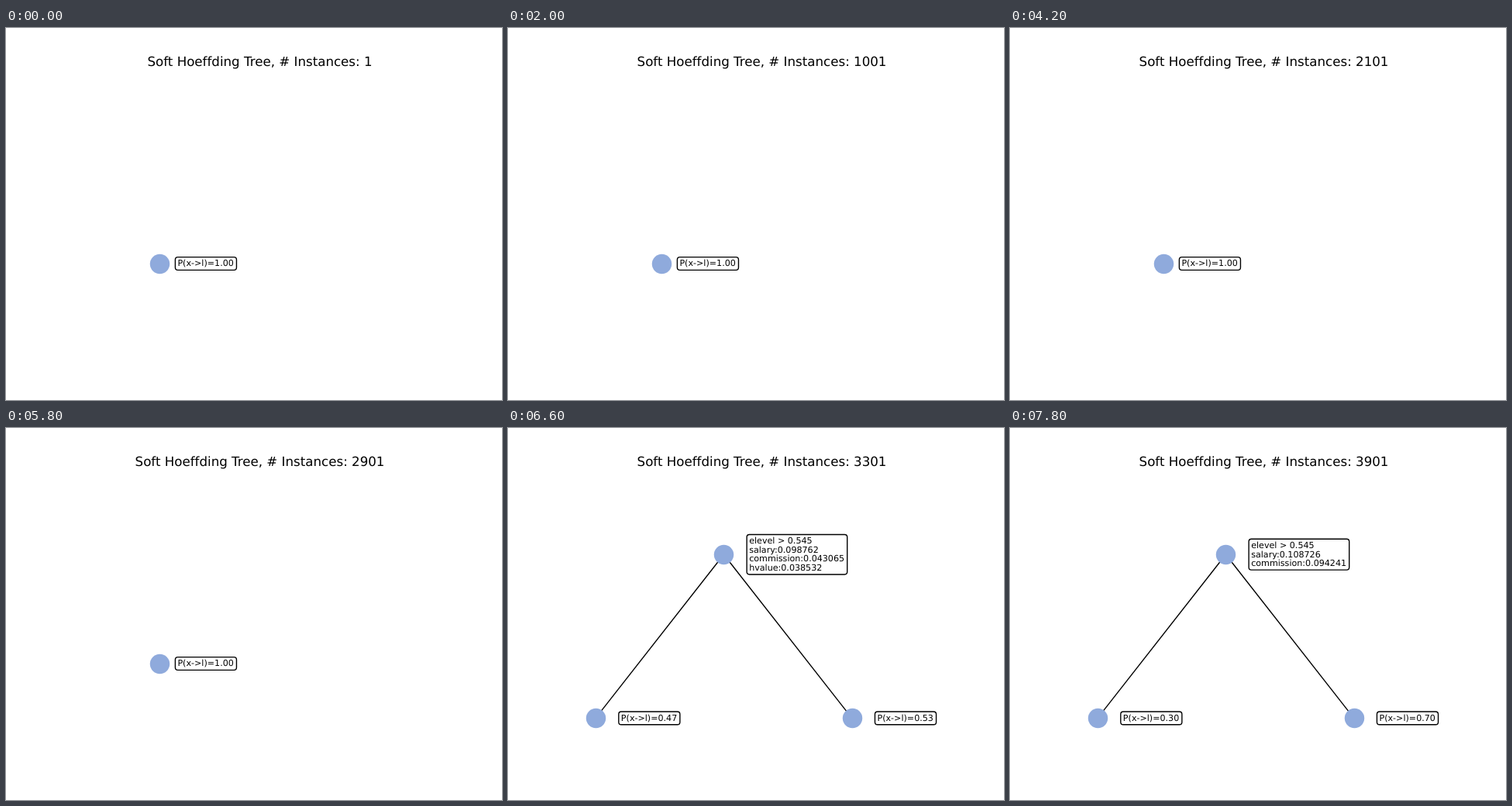
An HTML page with a canvas that plays this animation: 640x480 px, repeating every 8 s.

```html
<!DOCTYPE html>
<html lang="en">
<head>
<meta charset="utf-8">
<title>Soft Hoeffding Tree</title>
<style>
  html, body { margin: 0; width: 100%; height: 100%; overflow: hidden; background: #fff; }
  canvas { display: block; }
</style>
</head>
<body>
<canvas id="stage" width="640" height="480"></canvas>
<script>
const ctx = document.getElementById('stage').getContext('2d');

const LOOP = 8000, STEP = 200, SPLIT = 30;
const PT = 100 / 72;
const SMALL = 8 * PT, BIG = 12 * PT;
const ASCENT = 8, DESCENT = 2, LEADING = 11.6;
const PAD = 0.3 * SMALL;
const NODE_R = 12.72;

const single = { x: 198.1, y: 304 };
const root = { x: 278.4, y: 163.2 };
const left = { x: 113.07, y: 374.4 };
const right = { x: 443.73, y: 374.4 };

// Split weights move between these points; small ones are not listed.
const CUTOFF = 0.02;
const early = {
  p: 0.94, salary: 0.063585, commission: 0.037945,
  age: 0.02694, hvalue: 0.077065, hyears: 0.027004
};
const middle = { p: 0, salary: 0.133939, commission: 0.048185 };
const late = { p: 0.3, salary: 0.108726, commission: 0.094241 };

// The split state at a step, linear between the points four steps apart.
function splitState(step) {
  const k = (step - SPLIT - 1) / 4;
  const [a, b, f] = k < 1 ? [early, middle, k] : [middle, late, k - 1];
  const mix = key => (a[key] ?? 0) * (1 - f) + (b[key] ?? 0) * f;
  const [, ...features] = Object.keys(early);
  return {
    p: Math.min(1, mix('p')),
    rows: features
      .filter(key => mix(key) > CUTOFF)
      .map(key => `${key}:${mix(key).toFixed(6)}`)
  };
}

function setFont(size) {
  ctx.font = `${size}px "DejaVu Sans", sans-serif`;
  ctx.textRendering = 'geometricPrecision';
  ctx.letterSpacing = '0.001px'; // keeps "ff" as two letters
}

function drawTitle(count) {
  const text = `Soft Hoeffding Tree, # Instances: ${count}`;
  setFont(BIG);
  ctx.fillStyle = '#000';
  ctx.fillText(text, 327.5 - ctx.measureText(text).width / 2, 49);
}

// Nodes sit on pixel centres.
function drawNode({ x, y }) {
  ctx.fillStyle = '#8faadc';
  ctx.beginPath();
  ctx.arc(Math.round(x) + 0.5, Math.round(y) + 0.5, NODE_R, 0, 2 * Math.PI);
  ctx.fill();
}

function drawEdge(a, b) {
  ctx.beginPath();
  ctx.moveTo(a.x, a.y);
  ctx.lineTo(b.x, b.y);
  ctx.stroke();
}

// Boxed text, vertically centred beside a node.
function drawLabel(node, gap, lines) {
  setFont(SMALL);
  const x = node.x + gap;
  const w = Math.max(...lines.map(s => ctx.measureText(s).width));
  const h = ASCENT + DESCENT + LEADING * (lines.length - 1);
  const top = node.y - h / 2;
  ctx.beginPath();
  ctx.roundRect(x - PAD, top - PAD, w + 2 * PAD, h + 2 * PAD, PAD);
  ctx.fillStyle = '#fff';
  ctx.fill();
  ctx.stroke();
  ctx.fillStyle = '#000';
  lines.forEach((s, i) => {
    const base = Math.ceil(top + ASCENT + LEADING * i - 0.01);
    ctx.fillText(s, x - 0.3, base);
  });
}

const chance = p => [`P(x->l)=${p.toFixed(2)}`];

function drawTree({ p, rows }) {
  const gap = 33.07;
  drawEdge(root, left);
  drawEdge(root, right);
  [root, left, right].forEach(drawNode);
  drawLabel(root, gap, ['elevel > 0.545', ...rows]);
  drawLabel(left, gap, chance(p));
  drawLabel(right, gap, chance(1 - p));
}

function draw(time) {
  const step = Math.floor((time % LOOP) / STEP);
  ctx.fillStyle = '#fff';
  ctx.fillRect(0, 0, 640, 480);
  ctx.strokeStyle = '#000';
  ctx.lineWidth = PT;
  drawTitle(1 + 100 * step);
  if (step < SPLIT) {
    drawNode(single);
    drawLabel(single, 23.62, chance(1));
  } else {
    drawTree(splitState(step));
  }
}

const start = performance.now();
function tick() {
  draw(performance.now() - start);
  requestAnimationFrame(tick);
}
tick();
</script>
</body>
</html>
```
